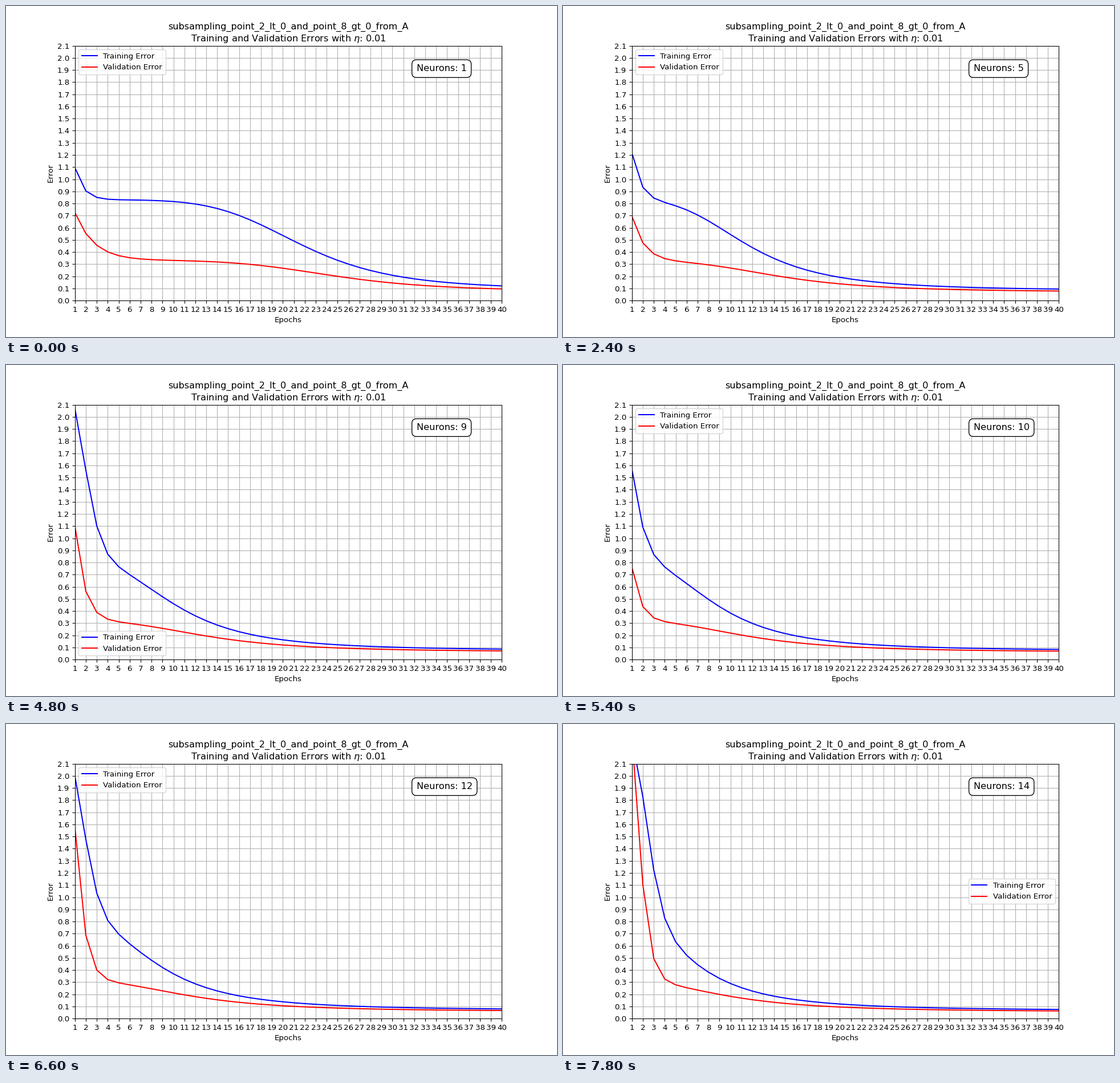
A matplotlib script for the animation above (8 s loop, 966x580 px).

```python
import numpy as np
import matplotlib.pyplot as plt
from matplotlib.animation import FuncAnimation

DPI = 96.6
STEP_MS = 200
FRAMES = 40
FRAMES_PER_MODEL = 3
EPOCHS = np.arange(1, 41)

# Key points over the neuron count: first-epoch errors, epoch of half descent
SIZES = [1, 3, 5, 7, 9, 10, 11, 12, 14]
TRAIN_START = [1.095, 1.345, 1.215, 1.83, 2.07, 1.57, 2.15, 2.0, 2.31]
VALID_START = [0.725, 0.845, 0.695, 1.425, 1.1, 0.76, 1.3, 1.575, 2.33]
HALF_EPOCH = [21.7, 22, 11.7, 10, 10.3, 8.9, 8.8, 8.7, 7.1]


def error_curve(start, plateau, floor, half, power, rate, hold):
    """A quick logistic drop onto a plateau that later descends to a floor."""
    base = floor + plateau / (1 + (EPOCHS / half) ** power)
    excess = start - base[0]
    delay = hold * excess ** 3
    drop = (1 + delay) / (delay + np.exp(rate * (EPOCHS - 1)))
    return base + excess * drop


def model_errors(n):
    """Training and validation errors for n neurons."""
    half = np.interp(n, SIZES, HALF_EPOCH)
    power = 1.1 + 0.185 * half
    train = error_curve(np.interp(n, SIZES, TRAIN_START), 0.74,
                        0.092 - 0.002 * n, half, power, 1.3, 1.5)
    valid = error_curve(np.interp(n, SIZES, VALID_START), 0.255,
                        0.078 - 0.0017 * n, half + 3, power,
                        0.5 + 0.08 * n, 0.2)
    return train, valid


fig, ax = plt.subplots(figsize=(966 / DPI, 580 / DPI), dpi=DPI)
train_line, = ax.plot([], [], color="blue", label="Training Error")
valid_line, = ax.plot([], [], color="red", label="Validation Error")
ax.set_title("subsampling_point_2_lt_0_and_point_8_gt_0_from_A\n"
             r"Training and Validation Errors with $\eta$: 0.01")
ax.set_xlabel("Epochs")
ax.set_ylabel("Error")
ax.set_xticks(EPOCHS)
ax.set_yticks(np.arange(22) / 10)
ax.set_xlim(1, 40)
ax.set_ylim(0, 2.1)
ax.grid(True)
badge = ax.text(0.8, 0.9, "", transform=ax.transAxes, fontsize=12,
                bbox=dict(facecolor="white", edgecolor="black",
                          boxstyle="round,pad=0.5"))
# The legend moves to whichever spot the curves and the badge leave free
legend = ax.legend(loc="best")


def draw(i):
    neurons = i // FRAMES_PER_MODEL + 1
    train, valid = model_errors(neurons)
    train_line.set_data(EPOCHS, train)
    valid_line.set_data(EPOCHS, valid)
    badge.set_text(f"Neurons: {neurons}")
    return train_line, valid_line, badge, legend


anim = FuncAnimation(fig, draw, frames=FRAMES, interval=STEP_MS, repeat=True,
                     repeat_delay=0, blit=False)
plt.show()
```
